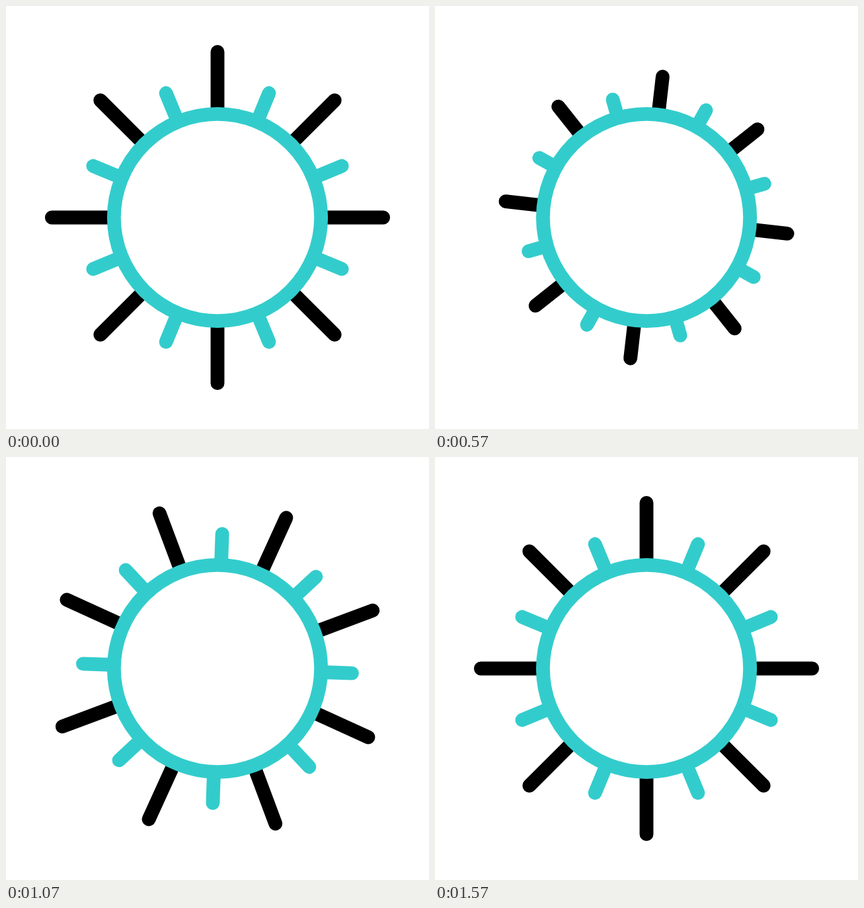
These frames come from a looping animation (640 px wide and 640 px high, 1670 ms). An HTML page with a canvas:

```html
<!DOCTYPE html>
<html lang="en">
<head>
<meta charset="utf-8">
<title>Sun</title>
<style>
  html, body { margin: 0; height: 100%; overflow: hidden; background: #fff; }
  canvas { display: block; width: 100vw; height: 100vh; }
</style>
</head>
<body>
<canvas id="stage" width="640" height="640"></canvas>
<script>
const ctx = document.getElementById('stage').getContext('2d');
const LOOP = 1670, STEP = 100 / 3, LAST = 47;
const TEAL = '#33cccc', RADIUS = 150, SCALE = 1.0444;

// Ease in and out: cubic-bezier(.42, 0, .58, 1), solved by bisection.
function ease(x) {
  let lo = 0, hi = 1;
  for (let i = 0; i < 24; i++) {
    const s = (lo + hi) / 2;
    if (1.26 * s - 0.78 * s * s + 0.52 * s ** 3 < x) lo = s; else hi = s;
  }
  return lo * lo * (3 - 2 * lo);
}

// Eased value at a step; keys are [step, value] pairs.
function track(step, keys) {
  const next = keys.findIndex(key => key[0] > step);
  if (next < 0) return keys[keys.length - 1][1];
  const [s0, v0] = keys[next - 1], [s1, v1] = keys[next];
  return v0 + (v1 - v0) * ease((step - s0) / (s1 - s0));
}

function rays(color, length, offset) {
  ctx.strokeStyle = color;
  ctx.beginPath();
  for (let i = 0; i < 8; i++) {
    const a = i * Math.PI / 4 + offset, x = Math.cos(a), y = Math.sin(a);
    ctx.moveTo(x * RADIUS, y * RADIUS);
    ctx.lineTo(x * (RADIUS + length), y * (RADIUS + length));
  }
  ctx.stroke();
}

function draw(step) {
  const angle = track(step, [[0, 0], [18, -38.7], [LAST, 0]]) * Math.PI / 180;
  const reach = track(step, [[0, 1], [11.5, 0.23], [22.5, 1]]);

  ctx.setTransform(1, 0, 0, 1, 0, 0);
  ctx.fillStyle = '#fff';
  ctx.fillRect(0, 0, 640, 640);
  ctx.setTransform(SCALE, 0, 0, SCALE, 320, 320);
  ctx.lineWidth = 20;
  ctx.lineCap = 'round';
  rays('#000', 90 * reach, angle);
  rays(TEAL, 45 * reach, angle + Math.PI / 8);

  ctx.beginPath();
  ctx.arc(0, 0, RADIUS, 0, 2 * Math.PI);
  ctx.fill();
  ctx.stroke();
}

function tick() {
  const time = performance.now() % LOOP;
  draw(Math.min(LAST, Math.floor((time + 4) / STEP)));
  requestAnimationFrame(tick);
}
tick();
</script>
</body>
</html>
```
